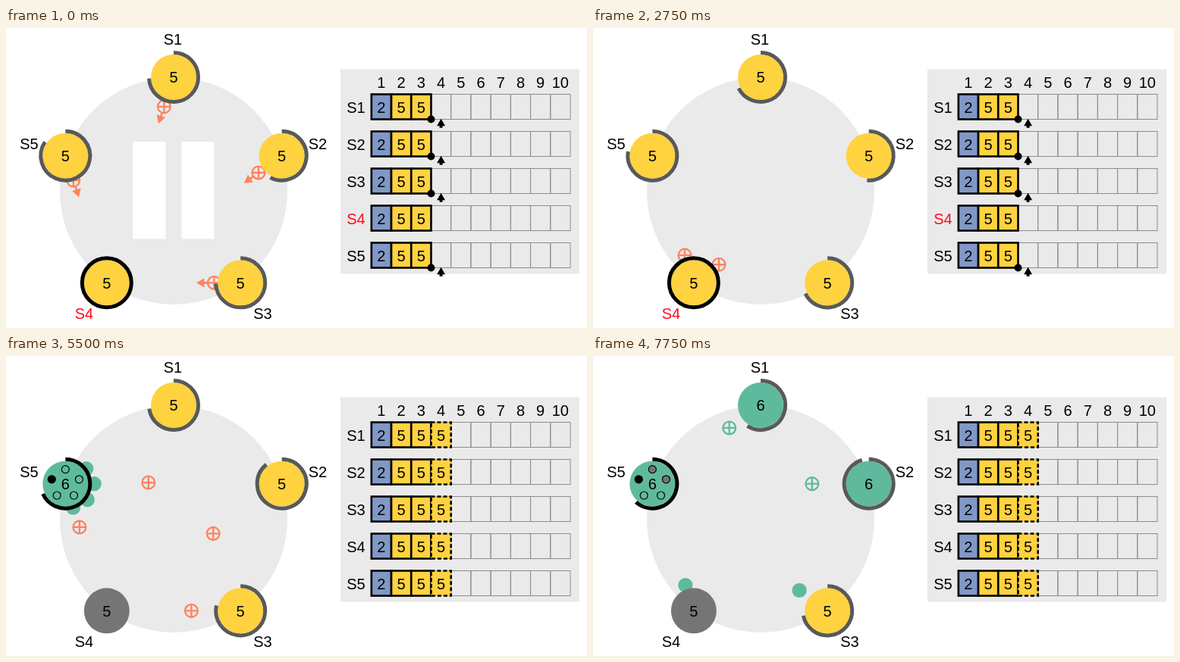
Recreate the animation shown at these times as an HTML page. Size 766x396 px, loop 8000 ms.

```html
<!DOCTYPE html>
<html lang="en">
<head>
<meta charset="utf-8">
<title>Leader election</title>
<style>
  html, body { margin: 0; width: 100%; height: 100%; overflow: hidden; background: #fff; }
  svg { display: block; width: 766px; height: 396px; }
  text { font: 20px "Liberation Sans", Arial, sans-serif; text-anchor: middle; }
</style>
</head>
<body>
<svg id="stage" viewBox="0 0 766 396"></svg>
<script>
const LOOP = 8000, HOLD = 750, STEP = 250;
const YELLOW = '#ffd23f', GREEN = '#5fba9d', ORANGE = '#ff835e', BLUE = '#8198c6';
const PANEL = '#eaeaea', STOPPED = '#757575', TIMER = '#595959', RED = '#fb0d1b';
const RADIUS = 30, DRAIN = 2.66;

// Moments of the story, in steps
const REQUEST = 9.53, STOP = 18.9, CANDIDATE = 19.74;

const LABELS = [[220, 22], [411, 160], [338.5, 384], [103, 384], [30.5, 160]];

// Election timers: [step of reset, angle at that step]
const TIMERS = [
  [[0, 267], [17.32, 269], [27.34, 217]],
  [[0, 208], [16.33, 331], [27.17, 349]],
  [[0, 268], [17.13, 290]],
  [],
  [[0, 304], [18.15, 300], [CANDIDATE, 246.5]]
];

// Step at which each server stores entry 4, and adopts term 6
const STORED = [17.32, 16.33, 17.13, REQUEST, 18.15];
const TERM6 = [27.34, 27.17, Infinity, Infinity, CANDIDATE];

// Messages: from, to, step sent, travel time, colour, reply?
const MESSAGES = [
  [0, 3, -0.35, 7.3, ORANGE, 1],
  [1, 3, -0.35, 9.83, ORANGE, 1],
  [2, 3, -0.35, 8.53, ORANGE, 1],
  [4, 3, -0.35, 10.07, ORANGE, 1],
  [3, 0, REQUEST, 7.79, ORANGE, 0],
  [3, 1, REQUEST, 6.8, ORANGE, 0],
  [3, 2, REQUEST, 7.6, ORANGE, 0],
  [3, 4, REQUEST, 8.62, ORANGE, 0],
  [0, 3, 17.32, 7.81, ORANGE, 1],
  [1, 3, 16.33, 10.1, ORANGE, 1],
  [2, 3, 17.13, 9.6, ORANGE, 1],
  [4, 3, 18.15, 7.13, ORANGE, 1],
  [4, 0, CANDIDATE, 7.6, GREEN, 0],
  [4, 1, CANDIDATE, 7.43, GREEN, 0],
  [4, 2, CANDIDATE, 9.96, GREEN, 0],
  [4, 3, CANDIDATE, 9.73, GREEN, 0],
  [0, 4, 27.34, 9.2, GREEN, 1],
  [1, 4, 27.17, 9.2, GREEN, 1]
];

function polar(cx, cy, r, deg) {
  const a = deg * Math.PI / 180;
  return [cx + r * Math.sin(a), cy - r * Math.cos(a)];
}
const server = i => polar(221, 215, 150, i * 72);

const circle = (x, y, r, fill, extra = '') =>
  `<circle cx="${x}" cy="${y}" r="${r}" fill="${fill}" ${extra}/>`;
const rect = (x, y, w, h, fill, extra = '') =>
  `<rect x="${x}" y="${y}" width="${w}" height="${h}" fill="${fill}" ${extra}/>`;
const path = (d, fill, extra = '') => `<path d="${d}" fill="${fill}" ${extra}/>`;
const text = (x, y, str, fill = '#000') => `<text x="${x}" y="${y}" fill="${fill}">${str}</text>`;
const line = (color, width) => `stroke="${color}" stroke-width="${width}"`;

function message([from, to, sent, time, color, reply], s) {
  const frac = (s - sent) / time;
  if (frac < 0 || frac >= 1) return '';
  const [x1, y1] = server(from), [x2, y2] = server(to);
  const dx = x2 - x1, dy = y2 - y1, len = Math.hypot(dx, dy);
  const d = (RADIUS + frac * (len - 2 * RADIUS)) / len;
  const x = x1 + dx * d, y = y1 + dy * d;
  if (!reply) return circle(x, y, 9.6, color);
  let out = circle(x, y, 8.4, 'none', line(color, 2.3)) +
    path(`M${x - 8} ${y}h16M${x} ${y - 8}v16`, 'none', line(color, 2.3));
  if (s === 0) {
    const turn = Math.atan2(dy, dx) * 180 / Math.PI;
    out += path('M9 -1.3H13V-6L23.5 0L13 6V1.3H9Z', color,
      `transform="translate(${x} ${y}) rotate(${turn})"`);
  }
  return out;
}

function timer(i, s, x, y) {
  const reset = TIMERS[i].filter(([at]) => at <= s).pop();
  if (!reset) return '';
  const deg = reset[1] - (s - reset[0]) * DRAIN, r = RADIUS + 2.5;
  const [ex, ey] = polar(x, y, r, deg);
  const color = i === 4 && s >= CANDIDATE ? '#000' : TIMER;
  return path(`M${x} ${y - r}A${r} ${r} 0 ${deg > 180 ? 1 : 0} 1 ${ex} ${ey}`, 'none', line(color, 5));
}

function votes(s, x, y) {
  let out = '';
  for (let i = 0; i < 5; i++) {
    const [vx, vy] = polar(x, y, 19, i * 72);
    const fill = i === 4 ? '#000' : s >= TERM6[i] ? STOPPED : 'none';
    out += circle(vx, vy, 5, fill, line('#000', 1.2));
  }
  return out;
}

function node(i, s) {
  const [x, y] = server(i);
  const stopped = i === 3 && s >= STOP, leader = i === 3 && !stopped;
  const next = s >= TERM6[i];
  let out = circle(x, y, RADIUS, stopped ? STOPPED : next ? GREEN : YELLOW);
  out += leader ? circle(x, y, RADIUS + 2.5, 'none', line('#000', 5)) : timer(i, s, x, y);
  if (i === 4 && next) out += votes(s, x, y);
  return out + text(x, y + 7.2, next ? 6 : 5) +
    text(...LABELS[i], 'S' + (i + 1), leader ? RED : '#000');
}

function logs(s) {
  const left = 481.8, w = 26.22, h = 33;
  const leading = s < STOP;
  let out = rect(441, 54.5, 315, 270, PANEL);
  for (let c = 0; c < 10; c++) out += text(left + w * (c + 0.5), 79, c + 1);
  for (let i = 0; i < 5; i++) {
    const y = 87.5 + 49 * i;
    out += text(461.5, y + 24, 'S' + (i + 1), i === 3 && leading ? RED : '#000');
    for (let c = 0; c < 10; c++)
      out += rect(left + w * c, y, w, h, 'none', line('#8c8c8c', 1));
    const count = s >= STORED[i] ? 4 : 3;
    for (let c = 0; c < count; c++) {
      const dash = c === 3 ? ' stroke-dasharray="5 3"' : '';
      out += rect(left + w * c, y, w, h, c ? YELLOW : BLUE, line('#000', 2.6) + dash) +
        text(left + w * (c + 0.5), y + 24, c ? 5 : 2);
    }
    if (leading && i !== 3) {
      const ax = left + w * 3.5, ay = y + h - 0.8;
      out += circle(left + w * 3, y + h, 5, '#000') +
        path(`M${ax} ${ay}l5.5 9.5h-3.5v2.5h-4v-2.5h-3.5Z`, '#000');
    }
  }
  return out;
}

function scene(s) {
  let out = circle(221, 215, 150, PANEL);
  if (s === 0) out += rect(167, 150, 43.5, 128.5, '#fff') + rect(231.5, 150, 43, 128.5, '#fff');
  for (const m of MESSAGES) out += message(m, s);
  for (let i = 0; i < 5; i++) out += node(i, s);
  return out + logs(s);
}

const stage = document.getElementById('stage');
let shown = -1;
function tick() {
  const t = performance.now() % LOOP;
  const s = t < HOLD ? 0 : Math.floor((t - HOLD) / STEP) + 1;
  if (s !== shown) stage.innerHTML = scene(shown = s);
  requestAnimationFrame(tick);
}
tick();
</script>
</body>
</html>
```
